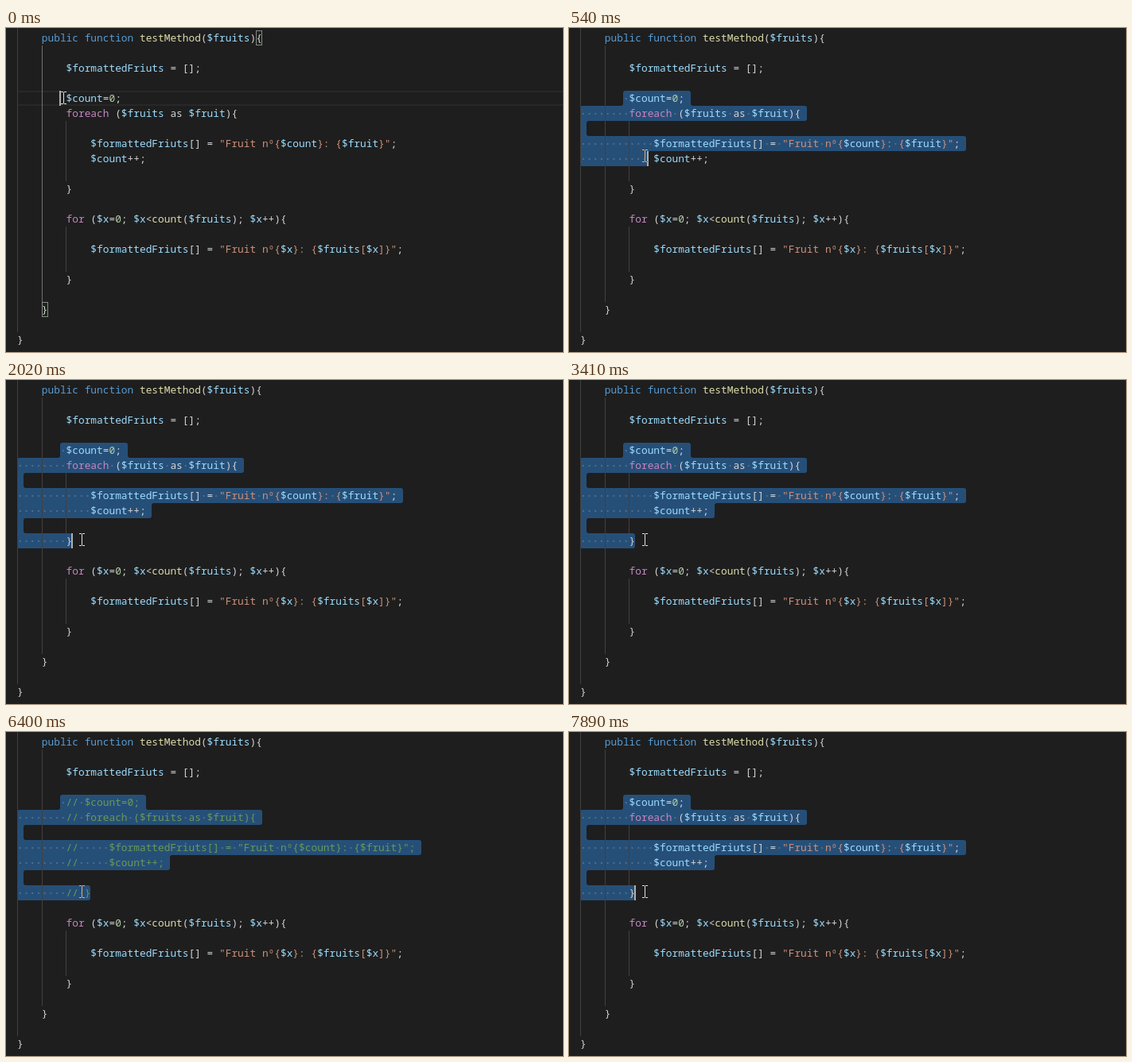
Recreate the animation shown at these times as an HTML page with a canvas. Size 700 by 408 pixels, loop 8000 ms.

```html
<!DOCTYPE html>
<html lang="en">
<head>
<meta charset="utf-8">
<title>Toggling a comment block</title>
<style>
html, body { margin: 0; width: 100%; height: 100%; overflow: hidden; background: #1e1e1e; }
canvas { display: block; }
</style>
</head>
<body>
<canvas id="stage" width="700" height="408"></canvas>
<script>
const ctx = document.getElementById('stage').getContext('2d');
const LOOP = 8000, LEFT = 14, TOP = 3, CHAR = 7.697, LINE = 19;
const ANCHOR = { row: 4, col: 7 };

const plain = `    public function testMethod($fruits){

        $formattedFriuts = [];

        $count=0;
        foreach ($fruits as $fruit){

            $formattedFriuts[] = "Fruit nº{$count}: {$fruit}";
            $count++;

        }

        for ($x=0; $x<count($fruits); $x++){

            $formattedFriuts[] = "Fruit nº{$x}: {$fruits[$x]}";

        }

    }

}`.split('\n');
const commented = plain.map((s, row) =>
  row >= 4 && row <= 10 && s ? s.slice(0, 8) + '// ' + s.slice(8) : s);

// start time, caret row and column, pointer left and top
const drag = [
  [0, 4, 7, 69, 80],
  [120, 5, 31, 247, 96],
  [270, 6, 0, 330, 117],
  [400, 7, 10, 92, 138],
  [540, 8, 11, 92, 153],
  [690, 9, 0, 92, 174],
  [810, 9, 0, 92, 181],
  [930, 10, 9, 92, 187],
  [1080, 10, 9, 92, 192],
  [1330, 10, 9, 92, 193],
  [3940, 10, 12, 92, 193],
  [7760, 10, 9, 92, 193]
];
// the caret flips at each of these times
const blinks = [1480, 2020, 2420, 2880, 3410, 3940, 4490, 4920, 5510, 5970, 6400, 6930, 7460, 7760];

const rules = [
  [/^\/\/.*/, '#6a9955'],
  [/^\$\w+/, '#9cdcfe'],
  [/^(public|function)\b/, '#569cd6'],
  [/^(foreach|for)\b/, '#c586c0'],
  [/^(testMethod|count)\b/, '#dcdcaa'],
  [/^\d+/, '#b5cea8'],
  [/^(\w+|.)/, '#d4d4d4']
];

const colX = col => LEFT + col * CHAR;
const pixelX = col => Math.round(colX(col));
const rowY = row => TOP + row * LINE;

function rect(color, x, y, w, h) {
  ctx.fillStyle = color;
  ctx.fillRect(x, y, w, h);
}

function drawLine(text, row) {
  let col = 0, quoted = false;
  while (col < text.length) {
    const rest = text.slice(col);
    let [token, color] = ['', ''];
    for (const [pattern, tint] of rules) {
      const match = rest.match(pattern);
      if (match) { [token, color] = [match[0], tint]; break; }
    }
    if (quoted && token[0] !== '$' || token === '"') color = '#ce9178';
    if (token === '"') quoted = !quoted;
    ctx.fillStyle = color;
    for (const ch of token) ctx.fillText(ch, colX(col++), rowY(row) + 14);
  }
}

function selectedRows(lines, row, col) {
  const rows = [];
  for (let r = ANCHOR.row; r <= row; r++) {
    const from = r === ANCHOR.row ? ANCHOR.col : 0;
    const to = r === row ? col : lines[r].length + 1;
    if (to > from) rows.push({ r, from, to });
  }
  return rows;
}

function drawSelection(rows) {
  if (!rows.length) return;
  const right = [], left = [];
  for (const { r, from, to } of rows) {
    right.push([pixelX(to), rowY(r)], [pixelX(to), rowY(r + 1)]);
    left.unshift([pixelX(from), rowY(r + 1)], [pixelX(from), rowY(r)]);
  }
  const points = [...right, ...left];
  const start = [(right[0][0] + left.at(-1)[0]) / 2, right[0][1]];
  ctx.beginPath();
  ctx.moveTo(...start);
  points.forEach((p, i) => ctx.arcTo(...p, ...(points[i + 1] || start), 3));
  ctx.closePath();
  ctx.fillStyle = '#264f78';
  ctx.fill();
}

function drawSpaces(lines, rows) {
  for (const { r, from, to } of rows)
    for (let c = from; c < to; c++)
      if (lines[r][c] === ' ')
        rect('rgba(227,228,226,.2)', colX(c + .5) - 1, rowY(r) + 9, 2, 2);
}

function drawGuide(col, first, last, color = '#404040') {
  const y = Math.max(0, first < 1 ? 0 : rowY(first));
  rect(color, Math.floor(colX(col) + .3), y, 1, rowY(last + 1) - y);
}

function drawBracketBox(row, col) {
  const x = Math.round(colX(col));
  rect('rgba(0,100,0,.1)', x, rowY(row), 8, LINE);
  ctx.strokeStyle = '#888';
  ctx.strokeRect(x + .5, rowY(row) + .5, 7, LINE - 1);
}

function drawPointer(x, y) {
  ctx.globalCompositeOperation = 'difference';
  for (const edge of [y, y + 15]) {
    rect('#fff', x, edge, 3, 1);
    rect('#fff', x + 4, edge, 3, 1);
  }
  rect('#fff', x + 3, y + 1, 1, 14);
  ctx.globalCompositeOperation = 'source-over';
}

function draw(t) {
  const [, row, col, px, py] = drag.findLast(step => step[0] <= t);
  const off = t >= 3940 && t < 7760;
  const lines = off ? commented : plain;
  const idle = t < 120;
  const caretOn = blinks.filter(b => b <= t).length % 2 === 0;
  const rows = selectedRows(lines, row, col);

  rect('#1e1e1e', 0, 0, 700, 408);
  if (idle) {
    rect('#282828', LEFT, rowY(4), 700, 2);
    rect('#282828', LEFT, rowY(5) - 2, 700, 2);
  }
  drawSelection(rows);
  drawGuide(0, 0, 19);
  drawGuide(4, 1, 17, idle ? '#707070' : undefined);
  if (!off) drawGuide(8, 6, 9);
  drawGuide(8, 13, 15);
  if (idle) {
    drawBracketBox(0, 39);
    drawBracketBox(18, 4);
  }
  drawSpaces(lines, rows);
  ctx.font = '12.83px "Noto Sans Mono", "DejaVu Sans Mono", monospace';
  lines.forEach(drawLine);
  if (caretOn) rect('#aeafad', Math.max(LEFT, pixelX(col) - 1), rowY(row), 2, LINE);
  drawPointer(px, py);
}

const begin = performance.now();
function frame() {
  draw((performance.now() - begin) % LOOP);
  requestAnimationFrame(frame);
}
frame();
</script>
</body>
</html>
```
